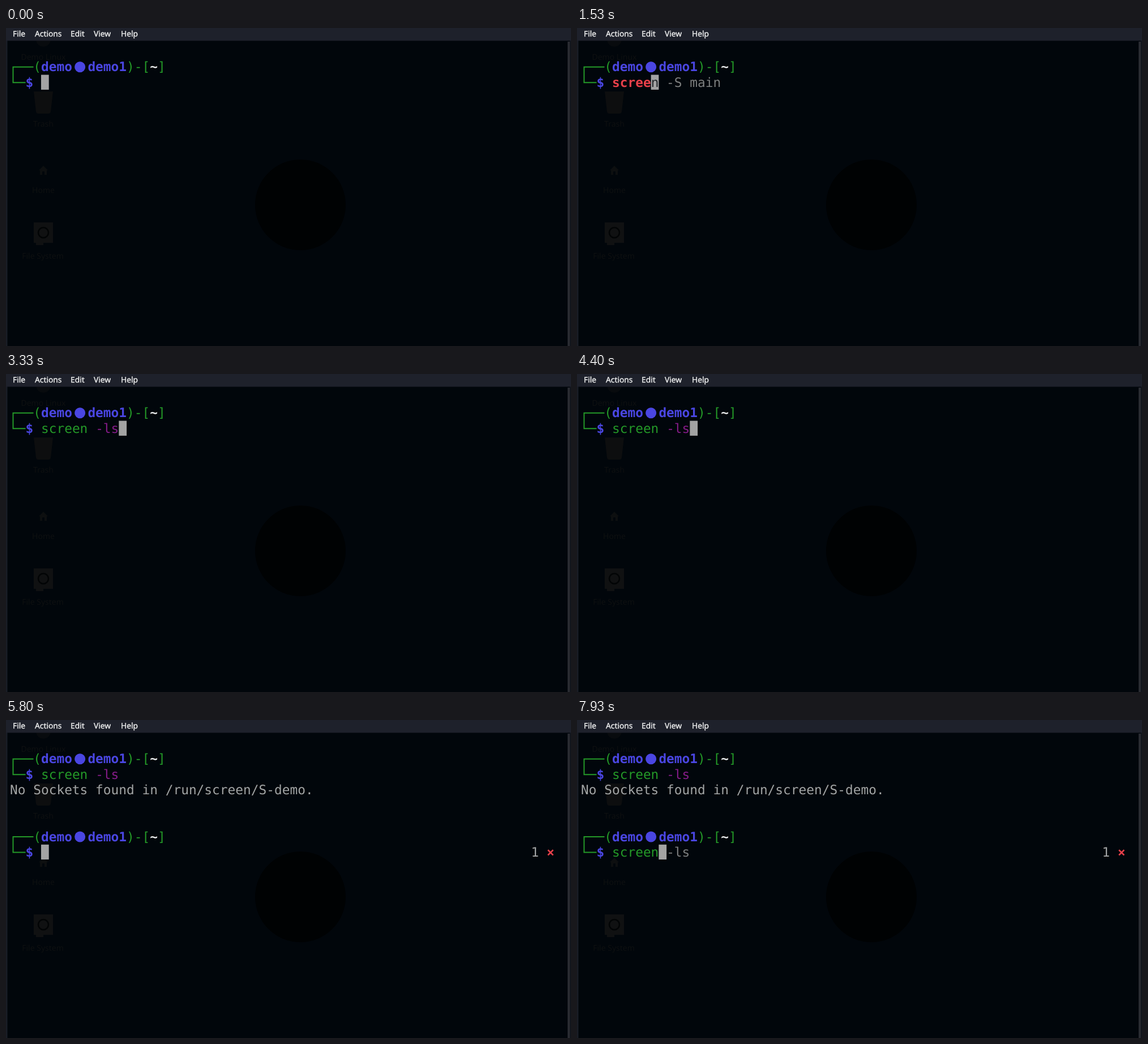
An HTML page for the animation above (8 s loop, 998 by 561 pixels).

```html
<!DOCTYPE html>
<html lang="en">
<head>
<meta charset="utf-8">
<title>Terminal session</title>
<style>
  html, body { margin: 0; height: 100%; overflow: hidden; background: #01060b; }
  svg { display: block; }
  text { white-space: pre; text-rendering: geometricPrecision; }
  .menu text { font: 13.8px "Noto Sans", sans-serif; fill: #eceded; stroke: #eceded; stroke-width: .4; }
  .desktop text { font: 14px "Noto Sans", sans-serif; fill: #0e1011; text-anchor: middle; }
  .term text { font: 22.82px "DejaVu Sans Mono", monospace; fill: #a3a5a5; }
  .term .bold { font-weight: 700; }
  .term .green { fill: #249a28; }
  .term .blue { fill: #4a46e2; }
  .term .red { fill: #e8404a; }
  .term .magenta { fill: #861c8a; }
  .term .white { fill: #e8eaea; }
  .term .hint { fill: #7d7f7f; }
  .term .under { fill: #22272a; }
</style>
</head>
<body>
<svg width="998" height="561" viewBox="0 0 998 561">
  <rect width="998" height="561" fill="#01060b"/>
  <g class="desktop">
    <circle cx="520" cy="312" r="80" fill="#000203"/>
    <circle cx="66" cy="20" r="13" fill="#080b0e"/>
    <path d="M49 112H83L79 148Q78 151 75 151H57Q54 151 53 148Z" fill="#0d0e0f"/>
    <path d="M66 243L74 251H72V259H68V253H64V259H60V251H58Z" fill="#0d0f10"/>
    <path d="M49 343H83V379H66V383H53V379H49Z" fill="#101112"/>
    <circle cx="66" cy="361" r="9" fill="none" stroke="#020405" stroke-width="2.5"/>
    <text x="66" y="56">Demo Linux</text>
    <text x="66" y="174">Trash</text>
    <text x="66" y="291">Home</text>
    <text x="65" y="407">File System</text>
  </g>
  <g class="menu">
    <path d="M0 22H2.5V561H0Z" fill="#191d26"/>
    <path d="M992 24H996V561H992Z" fill="#292b31"/>
    <path d="M996 22H998V561H996Z" fill="#11151c"/>
    <rect width="998" height="22.5" fill="#1e212b"/>
    <text x="12" y="15.3">File</text>
    <text x="51" y="15.3">Actions</text>
    <text x="114" y="15.3">Edit</text>
    <text x="155" y="15.3">View</text>
    <text x="203" y="15.3">Help</text>
  </g>
  <g class="term" id="term"></g>
</svg>
<script>
  const LOOP = 8000, ENTER = 4470;
  const CELL = 13.74, LINE = 27.45, LEFT = 7, BASE = 76.3;
  const term = document.getElementById('term');

  const first = {
    command: 'screen -ls', history: 'screen -S main',
    keys: [230, 470, 800, 1130, 1470, 1800, 2070, 2400, 2730, 3070]
  };
  const second = {
    command: 'screen', history: 'screen -ls',
    keys: [6670, 6870, 7130, 7330, 7530, 7730]
  };

  const colX = col => LEFT + col * CELL;
  const rowY = row => BASE + row * LINE;
  const run = (col, row, style, string) =>
    `<text x="${colX(col)}" y="${rowY(row)}" class="${style}">${string}</text>`;

  function prompt(row) {
    const mid = rowY(row) - 7.5;
    return `<path d="M48.5 ${mid}H12.5V${mid + LINE}H34.5" fill="none" stroke="#249a28" stroke-width="2"/>`
      + `<circle cx="${colX(9)}" cy="${mid}" r="9.5" fill="#4a46e2"/>`
      + run(3, row, 'green', '(')
      + run(4, row, 'blue bold', 'demo')
      + run(10, row, 'blue bold', 'demo1')
      + run(15, row, 'green', ')-[')
      + run(18, row, 'white bold', '~')
      + run(19, row, 'green', ']')
      + run(2, row + 1, 'blue bold', '$');
  }

  // Highlights the command word and its option the way the shell does.
  function typedText(typed, row) {
    const word = typed.slice(0, 6);
    return run(4, row, word === 'screen' ? 'green' : 'red bold', word)
      + run(11, row, 'magenta', typed.slice(7));
  }

  function inputLine({ command, history, keys }, time, row) {
    const typed = command.slice(0, keys.filter(key => key <= time).length);
    const col = 4 + typed.length;
    const hint = typed && history.startsWith(typed) ? history.slice(typed.length) : '';
    return typedText(typed, row)
      + `<rect x="${colX(col)}" y="${rowY(row) - 21.2}" width="${CELL}" height="26.3" fill="#a3a3a3"/>`
      + run(col, row, 'under', hint.slice(0, 1))
      + run(col + 1, row, 'hint', hint.slice(1));
  }

  function screenAt(time) {
    if (time < ENTER) return prompt(0) + inputLine(first, time, 1);
    return prompt(0) + typedText(first.command, 1)
      + run(0, 2, '', 'No Sockets found in /run/screen/S-demo.')
      + prompt(5) + inputLine(second, time, 6)
      + run(67, 6, '', '1') + run(69, 6, 'red bold', '×');
  }

  let shown = '';
  function draw() {
    const next = screenAt(performance.now() % LOOP);
    if (next !== shown) term.innerHTML = shown = next;
    requestAnimationFrame(draw);
  }
  draw();
</script>
</body>
</html>
```
